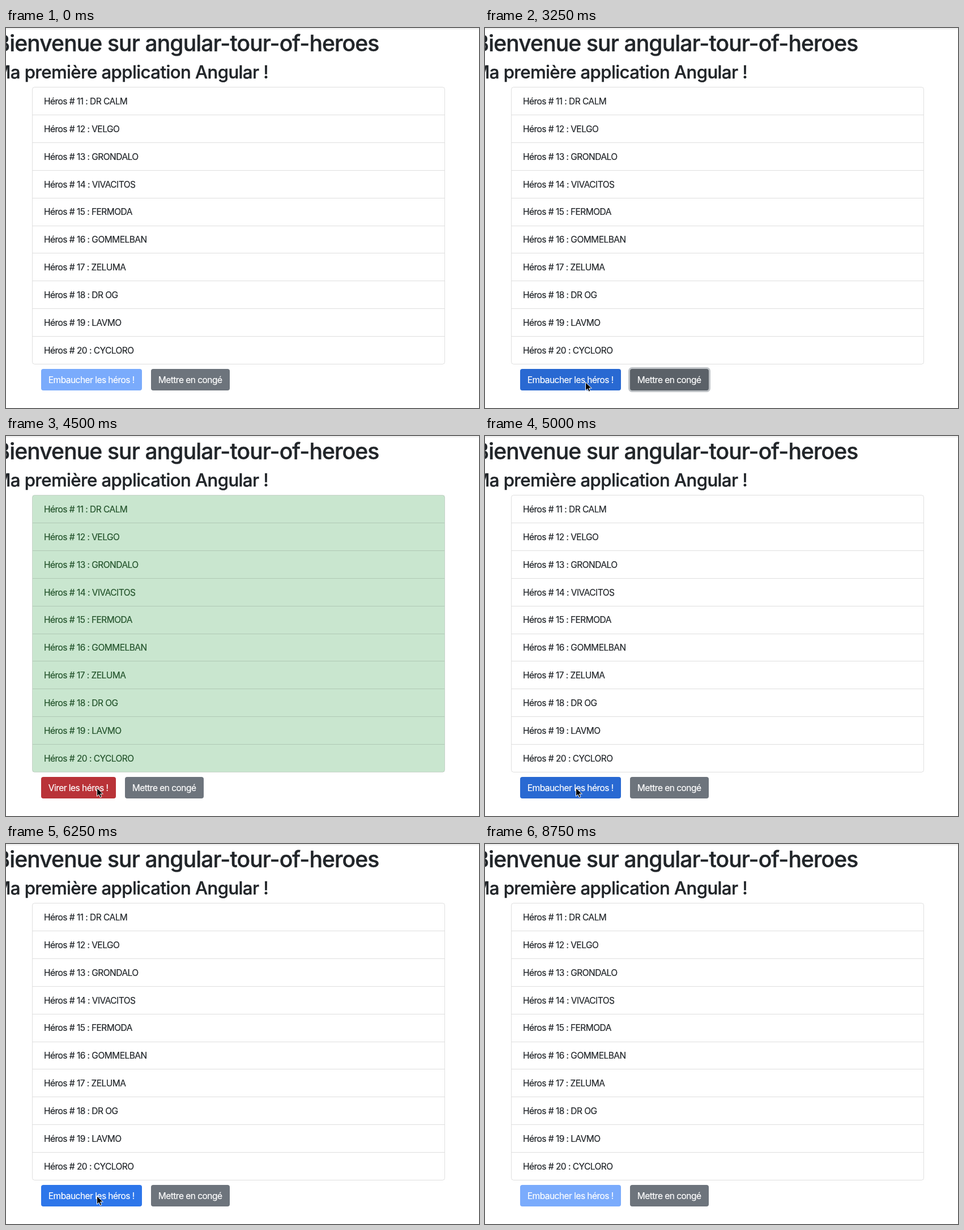
An HTML page that plays this animation: 835 px wide and 671 px high, repeating every 9 s.

```html
<!DOCTYPE html>
<html lang="fr">
<head>
<meta charset="utf-8">
<style>
  html, body { margin: 0; width: 100%; height: 100%; overflow: hidden; background: #fff; }
  svg { display: block; }
  text {
    font: 15.5px Inter, "Liberation Sans", sans-serif;
    font-optical-sizing: none;
    letter-spacing: -.53px;
    fill: currentColor;
    stroke: currentColor;
    stroke-width: .2px;
  }
  svg { color: #212529; }
  .title { font-size: 39px; font-weight: 500; letter-spacing: -.022em; text-anchor: middle; stroke-width: .4px; }
  .subtitle { font-size: 31.2px; font-weight: 500; letter-spacing: -.0185em; text-anchor: middle; stroke-width: .4px; }
  .frame { stroke: #000; stroke-opacity: .125; }
  .button { color: #fff; }
</style>
</head>
<body>
<svg width="835" height="671" viewBox="0 0 835 671">
  <path d="M0 1.5H835" stroke="#dcdcdc"/>
  <text class="title" x="320" y="41">Bienvenue sur angular-tour-of-heroes</text>
  <text class="subtitle" x="221.5" y="89">Ma première application Angular !</text>
  <rect id="panel" class="frame" x="46.5" y="104.5" width="728" height="489" rx="4"/>
  <path id="dividers" class="frame" fill="none"/>
  <g id="rows"></g>
  <g id="main" class="button">
    <rect x="62" y="602" height="38" rx="4"/>
    <text x="74.8" y="627"></text>
  </g>
  <g id="leave" class="button">
    <rect id="ring" x="-3" y="599" width="145" height="44" rx="6.5" fill="#c0c4c8"/>
    <rect id="leaveBox" y="602" width="139" height="38" rx="4"/>
    <text x="12.8" y="627">Mettre en congé</text>
  </g>
  <path id="cursor" d="M.5 .5V15.2L3.9 12 6.3 17.2 8.9 16.1 6.6 11H11.4Z"
        fill="#000" stroke="#fff" stroke-linejoin="round"/>
</svg>
<script>
const LOOP = 9000;
const ROW_HEIGHT = 48.9;
const heroes = ["DR CALM", "VELGO", "GRONDALO", "VIVACITOS", "FERMODA",
                "GOMMELBAN", "ZELUMA", "DR OG", "LAVMO", "CYCLORO"];
const byId = id => document.getElementById(id);
const [panel, dividers, rows, main, leave, ring, leaveBox, cursor] =
  ["panel", "dividers", "rows", "main", "leave", "ring", "leaveBox", "cursor"].map(byId);
const [mainBox, mainLabel] = main.children;

rows.innerHTML = heroes.map((name, i) =>
  `<text x="67" y="${Math.round(134.8 + ROW_HEIGHT * i)}">Héros # ${i + 11} : ${name}</text>`).join("");
dividers.setAttribute("d", heroes.slice(1).map((_, i) =>
  `M47 ${Math.round(104 + ROW_HEIGHT * (i + 1)) + .5}H774`).join(""));

const mainFills = {
  disabled: "#7aabfc", hire: "#2d76ea", hireHover: "#2969d2",
  fire: "#cb424a", fireHover: "#b93338"
};
const leaveFills = { rest: "#6d747c", hover: "#5b6168", focus: "#5b6168" };

// start time, main button, second button, pointer tip (absent when hidden)
const steps = [
  [0, "disabled", "rest"],
  [250, "disabled", "rest", 596, 347],
  [750, "disabled", "rest", 508, 432],
  [1000, "disabled", "rest", 352, 556],
  [1250, "disabled", "rest", 206, 616],
  [1500, "disabled", "rest", 140, 622],
  [1750, "disabled", "rest", 125, 622],
  [2250, "disabled", "rest", 200, 624],
  [2500, "disabled", "hover", 290, 625],
  [2750, "hire", "focus", 296, 625],
  [3000, "hire", "focus", 222, 625],
  [3250, "hireHover", "focus", 177, 625],
  [3500, "fire", "rest", 177, 625],
  [3750, "fireHover", "rest", 165, 623],
  [4500, "fireHover", "rest", 160, 621],
  [4750, "hire", "rest", 160, 621],
  [5000, "hireHover", "rest", 160, 621],
  [5500, "fire", "rest", 160, 621],
  [5750, "fireHover", "rest", 160, 621],
  [6250, "hire", "rest", 160, 621],
  [6500, "hireHover", "rest", 160, 621],
  [6750, "hireHover", "rest", 205, 625],
  [7000, "hire", "hover", 290, 629],
  [7250, "hire", "hover", 316, 629],
  [7500, "disabled", "focus", 316, 629],
  [8000, "disabled", "focus", 300, 630],
  [8250, "disabled", "focus", 245, 631],
  [8500, "disabled", "focus", 192, 631],
  [8750, "disabled", "rest"]
];

function show([, mainState, leaveState, x, y]) {
  const hired = mainState.startsWith("fire");
  panel.setAttribute("fill", hired ? "#c9e6cf" : "#fff");
  rows.style.color = hired ? "#23532b" : "#212529";
  mainBox.setAttribute("width", hired ? 132 : 178);
  mainBox.setAttribute("fill", mainFills[mainState]);
  mainLabel.textContent = hired ? "Virer les héros !" : "Embaucher les héros !";
  leave.setAttribute("transform", `translate(${hired ? 210 : 256})`);
  leaveBox.setAttribute("fill", leaveFills[leaveState]);
  ring.style.display = leaveState === "focus" ? "" : "none";
  cursor.style.display = x === undefined ? "none" : "";
  if (x !== undefined) cursor.setAttribute("transform", `translate(${x} ${y})`);
}

let current;
function tick() {
  const time = performance.now() % LOOP;
  const step = steps.findLast(([start]) => start <= time);
  if (step !== current) show(current = step);
  requestAnimationFrame(tick);
}
tick();
</script>
</body>
</html>
```
